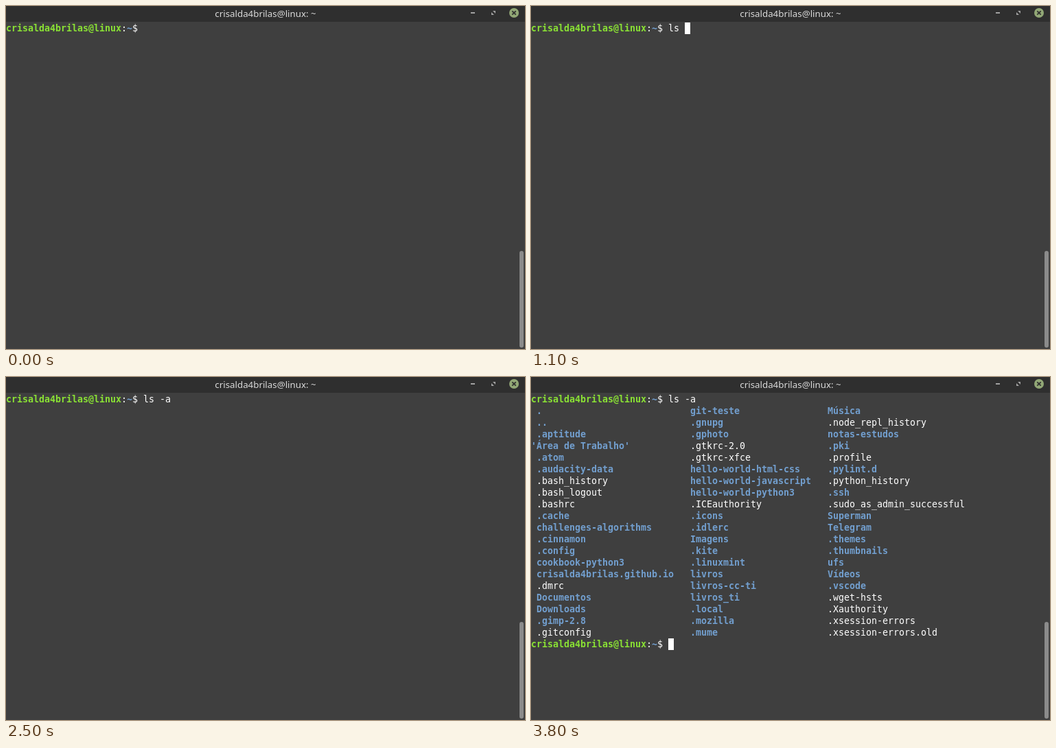
Animation, 756 px wide and 500 px high, one loop 4.3 s. Source, as an HTML page with a canvas:

```html
<!DOCTYPE html>
<html lang="pt-BR">
<head>
<meta charset="utf-8">
<title>Terminal</title>
<style>
  html, body { margin: 0; width: 100%; height: 100%; overflow: hidden; background: #3f3f3f; }
  canvas { display: block; }
</style>
</head>
<body>
<canvas id="stage" width="756" height="500"></canvas>
<script>
const ctx = document.getElementById('stage').getContext('2d', { alpha: false });

const LOOP = 4300;
const CELL = 8, ROW = 17, TOP = 24, BASE = 13;
const USER = 'crisalda4brilas';
const PROMPT_COLS = USER.length + 10;
const WHITE = '#ffffff', GREEN = '#8ae234', BLUE = '#729fcf';
const MONO = '13.29px "DejaVu Sans Mono", monospace';

// Typed text and cursor state from each moment on
const steps = [
  { at: 0, text: '', cursor: false },
  { at: 400, text: 'l', cursor: true },
  { at: 700, text: 'ls', cursor: true },
  { at: 1100, text: 'ls ', cursor: true },
  { at: 1600, text: 'ls -', cursor: true },
  { at: 1900, text: 'ls -a', cursor: true },
  { at: 2500, text: 'ls -a', cursor: false },
  { at: 2600, text: 'ls -a', cursor: true, listed: true },
  { at: 3200, text: 'ls -a', cursor: false, listed: true },
  { at: 3800, text: 'ls -a', cursor: true, listed: true }
];

// A trailing slash marks a directory
const columns = [
  { col: 1, names: `./
../
.aptitude/
'Área de Trabalho'/
.atom/
.audacity-data/
.bash_history
.bash_logout
.bashrc
.cache/
challenges-algorithms/
.cinnamon/
.config/
cookbook-python3/
${USER}.github.io/
.dmrc
Documentos/
Downloads/
.gimp-2.8/
.gitconfig` },
  { col: 29, names: `git-teste/
.gnupg/
.gphoto/
.gtkrc-2.0
.gtkrc-xfce
hello-world-html-css/
hello-world-javascript/
hello-world-python3/
.ICEauthority
.icons/
.idlerc/
Imagens/
.kite/
.linuxmint/
livros/
livros-cc-ti/
livros_ti/
.local/
.mozilla/
.mume/` },
  { col: 54, names: `Música/
.node_repl_history
notas-estudos/
.pki/
.profile
.pylint.d/
.python_history
.ssh/
.sudo_as_admin_successful
Superman/
Telegram/
.themes/
.thumbnails/
ufs/
Vídeos/
.vscode/
.wget-hsts
.Xauthority
.xsession-errors
.xsession-errors.old` }
];

function rect(x, y, w, h, color) {
  ctx.fillStyle = color;
  ctx.fillRect(x, y, w, h);
}

function poly(color, ...points) {
  ctx.fillStyle = color;
  ctx.beginPath();
  points.forEach(([x, y]) => ctx.lineTo(x, y));
  ctx.fill();
}

function write(text, col, row, color = WHITE, bold = false) {
  ctx.font = (bold ? 'bold ' : '') + MONO;
  ctx.textAlign = 'left';
  ctx.fillStyle = color;
  ctx.fillText(text, col * CELL, TOP + row * ROW + BASE);
}

function prompt(row, text, cursor) {
  const host = USER + '@linux';
  write(host, 0, row, GREEN, true);
  write(':', host.length, row);
  write('~', host.length + 1, row, BLUE, true);
  write('$ ' + text, host.length + 2, row);
  if (cursor) rect((PROMPT_COLS + text.length) * CELL, TOP + row * ROW, CELL, ROW, WHITE);
}

function listing() {
  for (const { col, names } of columns) {
    names.split('\n').forEach((entry, i) => {
      const dir = entry.endsWith('/');
      const name = dir ? entry.slice(0, -1) : entry;
      const start = name.startsWith("'") ? col - 1 : col;
      write(name, start, i + 1, dir ? BLUE : WHITE, dir);
    });
  }
}

function titleBar() {
  rect(0, 0, 756, 23, '#2f2f2f');
  ctx.font = '500 13.333px "Noto Sans", sans-serif';
  ctx.textAlign = 'center';
  ctx.fillStyle = '#dadada';
  ctx.fillText(USER + '@linux: ~', 378, 16);

  const icon = '#a2a2a2';
  rect(677, 9, 6, 2, icon);
  poly(icon, [709, 7], [713, 7], [713, 11]);
  poly(icon, [707, 9], [707, 13], [711, 13]);

  ctx.fillStyle = '#92a876';
  ctx.beginPath();
  ctx.arc(740, 10, 7, 0, Math.PI * 2);
  ctx.fill();
  ctx.strokeStyle = '#2f2f2f';
  ctx.lineWidth = 1.7;
  ctx.beginPath();
  ctx.moveTo(737.3, 7.3);
  ctx.lineTo(742.7, 12.7);
  ctx.moveTo(742.7, 7.3);
  ctx.lineTo(737.3, 12.7);
  ctx.stroke();
}

function scrollbar() {
  ctx.fillStyle = '#8b8b8b';
  ctx.beginPath();
  ctx.roundRect(748, 357, 6, 141, 3);
  ctx.fill();
}

function draw(now) {
  const t = now % LOOP;
  const step = steps.findLast(s => s.at <= t);
  rect(0, 0, 756, 500, '#3f3f3f');
  titleBar();
  prompt(0, step.text, step.cursor && !step.listed);
  if (step.listed) {
    listing();
    prompt(21, '', step.cursor);
  }
  scrollbar();
}

const begin = performance.now();
function tick() {
  draw(performance.now() - begin);
  requestAnimationFrame(tick);
}
tick();
</script>
</body>
</html>
```
